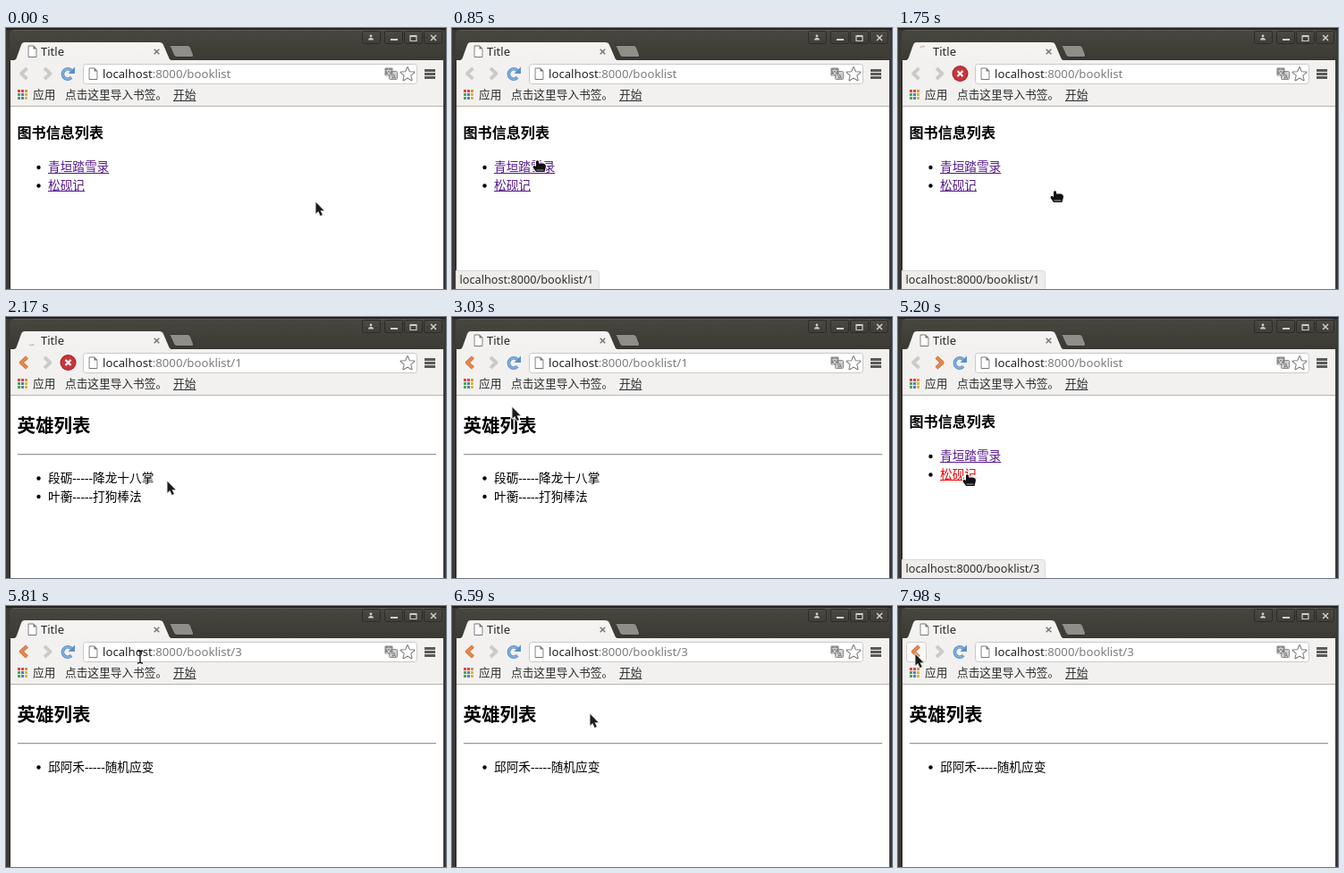
Animation of 492 by 292 pixels, one loop 8000 ms. Source, as an HTML page with a canvas:

```html
<!DOCTYPE html>
<html lang="zh-CN">
<head>
<meta charset="utf-8">
<title>Title</title>
<style>
html, body { margin: 0; width: 100%; height: 100%; overflow: hidden; background: #3a3935; }
canvas { display: block; width: 492px; height: 292px; }
</style>
</head>
<body>
<canvas id="stage"></canvas>
<script>
const LOOP = 8000, W = 492, H = 292;
const UI = '"Noto Sans", "Noto Sans CJK SC", sans-serif';
const PAGE = '"Liberation Serif", "Noto Sans CJK SC", serif';
const canvas = document.getElementById('stage');
const ctx = canvas.getContext('2d');
const scale = window.devicePixelRatio || 1;
canvas.width = W * scale;
canvas.height = H * scale;

// Pointer path: time, x, y
const pointerPath = [
  [0, 346, 194], [60, 346, 194], [850, 96, 148], [1690, 96, 148], [1750, 176, 182],
  [1900, 180, 183], [2670, 180, 183], [3030, 67, 100], [3150, 20, 50], [3240, 20, 50],
  [3450, 160, 177], [3510, 160, 177], [3690, 22, 52], [4780, 22, 52], [5140, 78, 176],
  [5630, 78, 176], [5810, 150, 57], [6110, 150, 57], [6590, 154, 120], [7560, 154, 120],
  [7960, 19, 53], [LOOP, 19, 53]
];
const books = ['青垣踏雪录', '松砚记'];
const heroes = {
  1: ['段砺-----降龙十八掌', '叶蘅-----打狗棒法'],
  3: ['邱阿禾-----随机应变']
};

const during = (t, ...spans) => spans.some(([a, b]) => t >= a && t < b);
const inside = (p, x0, y0, x1, y1) => p.x >= x0 && p.x < x1 && p.y >= y0 && p.y < y1;

function pointerAt(t) {
  const i = Math.max(1, pointerPath.findIndex(k => k[0] > t));
  const [t0, x0, y0] = pointerPath[i - 1], [t1, x1, y1] = pointerPath[i];
  const u = Math.min(1, Math.max(0, (t - t0) / (t1 - t0)));
  const e = u * u * (3 - 2 * u);
  return { x: x0 + (x1 - x0) * e, y: y0 + (y1 - y0) * e };
}

function stateAt(t) {
  const id = during(t, [2050, 4450]) ? 1 : t >= 5470 ? 3 : 0;
  return {
    id,
    path: during(t, [2050, 3940]) ? '/1' : t >= 5470 ? '/3' : '',
    loading: during(t, [970, 2290], [3940, 4600], [5260, 5500]),
    translate: !during(t, [2050, 2400], [3940, 4690], [5470, 5505]),
    back: during(t, [2050, 3940], [5470, LOOP]),
    forward: during(t, [3940, 5470]),
    status: during(t, [740, 2050]) ? 1 : during(t, [5090, 5690]) ? 3 : 0,
    active: during(t, [910, 1030]) ? 0 : during(t, [5160, 5260]) ? 1 : -1
  };
}

function rect(x, y, w, h, color) {
  ctx.fillStyle = color;
  ctx.fillRect(x, y, w, h);
}

function box(x, y, w, h, radius, fill, stroke) {
  ctx.beginPath();
  ctx.roundRect(x, y, w, h, radius);
  paint(fill, stroke);
}

function paint(fill, stroke, width = 1) {
  if (fill) { ctx.fillStyle = fill; ctx.fill(); }
  if (stroke) { ctx.strokeStyle = stroke; ctx.lineWidth = width; ctx.stroke(); }
}

function shape(d, x, y, fill, stroke, width = 1) {
  ctx.save();
  ctx.translate(x, y);
  const p = new Path2D(d);
  ctx.lineJoin = 'round';
  if (stroke) { ctx.strokeStyle = stroke; ctx.lineWidth = width; ctx.stroke(p); }
  if (fill) { ctx.fillStyle = fill; ctx.fill(p); }
  ctx.restore();
}

function disc(x, y, r, color) {
  ctx.beginPath();
  ctx.arc(x, y, r, 0, 7);
  paint(color);
}

function text(str, x, y, size, color, family = UI, weight = '') {
  ctx.font = `${weight} ${size}px ${family}`;
  ctx.fillStyle = color;
  ctx.fillText(str, x, y);
  return ctx.measureText(str).width;
}

function gradient(y0, y1, a, b) {
  const g = ctx.createLinearGradient(0, y0, 0, y1);
  g.addColorStop(0, a);
  g.addColorStop(1, b);
  return g;
}

const pageIcon = (x, y) => shape('M0 0H5L8 3V11.500H0ZM5 0V3H8', x + .5, y + .5, '#fff', '#777', 1.8);
const cross = (x, y, r, color, width) =>
  shape(`M${-r} ${-r}L${r} ${r}M${r} ${-r}L${-r} ${r}`, x, y, null, color, width);

function drawFrame() {
  rect(0, 0, W, H, '#3a3935');
  rect(0, 0, W, 2, '#23221f');
  box(4, 2, 486, 60, [5, 5, 0, 0], gradient(2, 37, '#48473f', '#3a3932'));
  rect(8, 2, 478, 1, '#5d5c55');
  rect(4, 37, 1, 255, '#23221f');

  const buttonFill = gradient(3, 18, '#4b4a43', '#3e3d37');
  for (const [x, w] of [[398.5, 20], [423.5, 20], [445.5, 20], [467.5, 20]])
    box(x, 3.5, w, 14, 2, buttonFill, '#2c2b28');
  const light = '#d3cfc6';
  disc(408, 9, 1.4, light);
  shape('M-3 2.500Q-3 0 0 0T3 2.500Z', 408, 11, light);
  rect(430, 12, 8, 2, light);
  shape('M0 0H7V6H0ZM0 1H7', 452, 8.5, null, light, 1.2);
  cross(478, 11, 3, light, 1.5);
}

function drawTab(t, s) {
  shape('M0 0H20Q22 0 23 2L26 10Q26.5 12 24 12H8Q6 12 5 10L1 1Z', 183, 20, '#8f8e89', '#2f2e2b', 1);
  shape('M7 37Q11 36 12 33L17 19Q18 16 21 16H171Q175 16 176 19L182 33Q183 36 187 37Z',
    0, 0, gradient(16, 38, '#f5f4f3', '#f2f1f0'));
  if (s.loading) {
    const a = -1.8 + (t - 1750) / 790 * Math.PI * 2;
    ctx.beginPath();
    ctx.arc(28.5, 26, 5.5, a - .5, a + .5);
    paint(null, '#d9b7a6', 1.5);
  } else {
    pageIcon(25, 20);
  }
  text('Title', 39, 30.5, 13, '#262626');
  cross(168.5, 26.5, 2.8, '#777', 1.5);
}

function drawChevron(x, dir, enabled) {
  const d = `M${3.5 * dir} -6L${-3 * dir} 0L${3.5 * dir} 6`;
  if (enabled) shape(d, x, 51, null, '#c06a35', 4.2);
  shape(d, x, 51, null, enabled ? '#e8894f' : '#cccac8', enabled ? 2.6 : 3.8);
}

function drawReload() {
  ctx.beginPath();
  ctx.arc(69, 51.5, 5.6, .75, 5.5);
  paint(null, '#5b8fc9', 3.6);
  paint(null, '#86b2e0', 1.6);
  shape('M0 0V7.500H-7.500Z', 77, 43.5, '#5b8fc9');
}

function drawToolbar(t, s, pointer) {
  rect(5, 36, 484, 52, '#f2f1f0');
  rect(5, 87, 484, 1, '#b6b4b1');
  const earlier = pointerAt(Math.max(0, t - 120));
  if (s.back && inside(pointer, 9, 40, 32, 63)) box(9.500, 40.5, 22, 22, 3, '#f8f8f7', '#d2d0cd');
  if (pointer.x < 150 && [pointer, earlier].some(p => inside(p, 7, 65, 60, 86)))
    box(7.500, 65.5, 52, 20, 3, '#f8f8f7', '#d2d0cd');

  drawChevron(20, 1, s.back);
  drawChevron(46.5, -1, s.forward);
  if (s.loading) {
    disc(69.5, 51, 9, '#a3282c');
    disc(69.5, 51, 7.8, '#c9353a');
    cross(69.5, 51, 3, '#fff', 2.2);
  } else {
    drawReload();
  }

  box(86.5, 40.5, 373, 22, 3, '#fff', '#cbc9c6');
  pageIcon(93, 45);
  const hostWidth = text('localhost', 108, 56, 13.2, '#222');
  text(':8000/booklist' + s.path, 108 + hostWidth, 56, 13.2, '#7c7c7c');
  if (s.translate) {
    box(428.5, 48.5, 9, 9, 1, '#d0d0d0', '#8a8a8a');
    box(423.5, 44.5, 9, 9, 1, '#8a8a8a');
    text('文', 424.5, 52, 7, '#fff');
    text('A', 431.5, 57, 7, '#666');
  }
  let star = '';
  for (let i = 0; i < 10; i++) {
    const r = i % 2 ? 3.4 : 7.8, a = i * Math.PI / 5;
    star += `${i ? 'L' : 'M'}${r * Math.sin(a)} ${-r * Math.cos(a)}`;
  }
  shape(star + 'Z', 449, 52, '#fff', '#777', 2);
  for (const y of [46, 50, 54]) rect(468, y, 12, 3, '#5a5a5a');

  const dots = ['#d9483b', '#d9483b', '#e0913a', '#4aa35a', '#4a7fd0', '#e0b33a', '#4aa35a', '#4a7fd0', '#e0b33a'];
  dots.forEach((c, i) => rect(13 + i % 3 * 4, 69 + Math.floor(i / 3) * 4, 3, 3, c));
  text('应用', 30, 79, 12.7, '#2c2c2c');
  text('点击这里导入书签。', 66, 79, 12.7, '#2c2c2c');
  const w = text('开始', 187, 79, 12.7, '#2c2c2c');
  rect(187, 81, w, 1, '#2c2c2c');
}

function drawPage(s) {
  rect(5, 88, 484, 204, '#fff');
  if (!s.id) {
    text('图书信息列表', 12.5, 123, 16.1, '#000', PAGE, 'bold');
    books.forEach((name, i) => {
      const y = 160 + i * 20.5, color = s.active === i ? '#e00' : '#551a8b';
      disc(36.5, y - 4, 2.2, '#000');
      const w = text(name, 47, y, 13.67, color, PAGE);
      rect(47, Math.round(y + 1.5), w, 1, color);
    });
    return;
  }
  text('英雄列表', 12.5, 129, 20.5, '#000', PAGE, 'bold');
  rect(13, 153, 468, 1, '#9a9a9a');
  rect(13, 154, 468, 1, '#e4e4e4');
  heroes[s.id].forEach((line, i) => {
    const y = 185 + i * 20.5;
    disc(36.5, y - 4.5, 2.2, '#000');
    text(line, 47, y, 13.67, '#000', PAGE);
  });
}

function drawStatus(id) {
  box(4.5, 271.5, 160, 24, [0, 3, 0, 0], '#eeedec', '#dddbd9');
  text('localhost:8000/booklist/' + id, 8.5, 286, 12.7, '#2c2c2c');
}

function drawHand(p) {
  shape('M-2 1Q-.5 -.5 1 1V3.500H6Q9 4 9 7L7.500 13H-2L-5.500 8Q-5.500 5.500 -3.500 6L-2 7Z',
    p.x, p.y, '#111', '#fff', 2);
  rect(p.x - 1.5, p.y + 10.5, 8, 1, '#aaa');
}

function drawPointer(s, p) {
  const overText = inside(p, 86, 40, 420, 63) || s.id && inside(p, 47, 171, 167, s.id === 1 ? 208 : 188);
  if (s.status && !s.id)
    drawHand(p);
  else if (overText)
    shape('M-3 -7Q0 -7 0 -5Q0 -7 3 -7M0 -5V5M-3 7Q0 7 0 5Q0 7 3 7', p.x, p.y, null, '#111', 1.3);
  else
    shape('M.5 1V13.500L3.300 11L5.600 16L7.800 15L5.500 10.200H9.500Z', p.x, p.y, '#1c1c1c', '#e4e4e4', 1.8);
}

function draw(now) {
  const t = now % LOOP, s = stateAt(t), pointer = pointerAt(t);
  ctx.setTransform(scale, 0, 0, scale, 0, 0);
  drawFrame();
  drawTab(t, s);
  drawToolbar(t, s, pointer);
  drawPage(s);
  if (s.status) drawStatus(s.status);
  drawPointer(s, pointer);
}

const start = performance.now();
function tick() {
  draw(performance.now() - start);
  requestAnimationFrame(tick);
}
tick();
</script>
</body>
</html>
```
